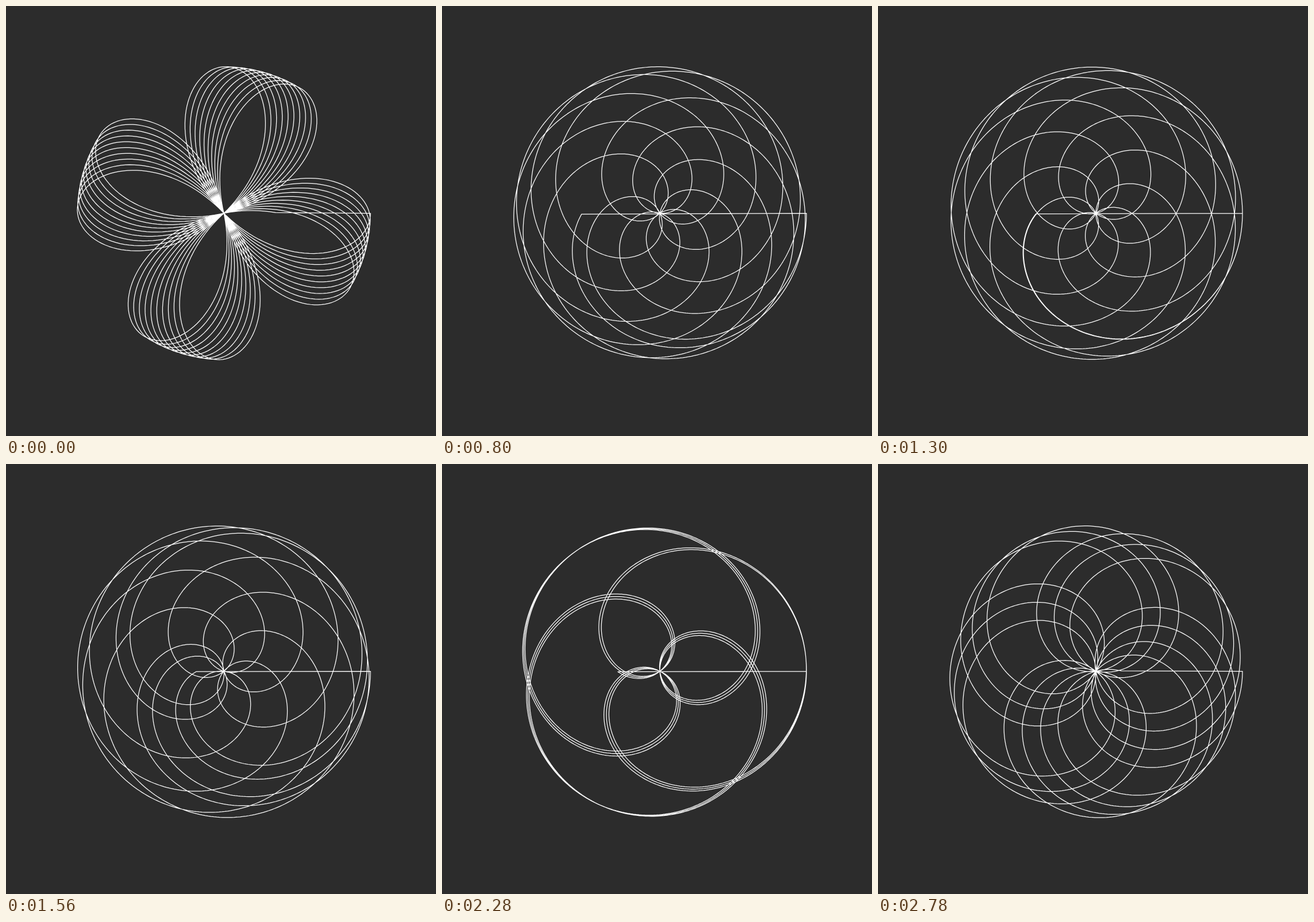
These frames come from a looping animation (748 by 748 pixels, 3.02 s). An HTML page with a canvas:

```html
<!DOCTYPE html>
<html lang="en">
<head>
<meta charset="utf-8">
<title>Rose curve</title>
<style>
  html, body { margin: 0; width: 100%; height: 100%; overflow: hidden; background: #2c2c2c; }
  canvas { display: block; width: 748px; height: 748px; }
</style>
</head>
<body>
<canvas id="stage" width="748" height="748"></canvas>
<script>
  const LOOP = 3020, HOLD = 250;
  const SIZE = 748, CX = 379, CY = 360.5, RADIUS = 255;
  const TURNS = 10, STEP = 0.02;

  // Key poses: time in ms and petal factor k of r = cos(k * angle)
  const KEYS = [
    { t: 0, k: 1.9811 },
    { t: 60, k: 0.205 },
    { t: 340, k: 0.2683 },
    { t: 800, k: 0.3661 },
    { t: 1300, k: 0.36835 },
    { t: 2020, k: 0.37975 },
    { t: 2520, k: 0.4948 },
    { t: 2760, k: 0.6779 }
  ];

  const ctx = document.getElementById("stage").getContext("2d");
  let shown = null;

  // Between two keys the petal width 1/k advances in equal held steps.
  function factorAt(ms) {
    const i = KEYS.findLastIndex(key => ms >= key.t);
    const from = KEYS[i];
    const to = KEYS[i + 1] || { t: LOOP, k: KEYS[0].k };
    const span = to.t - from.t;
    const steps = Math.max(1, Math.round(span / HOLD));
    const part = Math.floor((ms - from.t) / span * steps) / steps;
    return 1 / ((1 - part) / from.k + part / to.k);
  }

  function drawRose(k) {
    ctx.fillStyle = "#2c2c2c";
    ctx.fillRect(0, 0, SIZE, SIZE);
    ctx.strokeStyle = "#fff";
    ctx.lineWidth = 1.25;
    ctx.lineJoin = "round";
    ctx.beginPath();
    const count = Math.floor(TURNS * 2 * Math.PI / STEP);
    for (let i = 0; i <= count; i++) {
      const a = i * STEP;
      const r = RADIUS * Math.cos(k * a);
      ctx.lineTo(CX + r * Math.cos(a), CY + r * Math.sin(a));
    }
    ctx.closePath();
    ctx.stroke();
  }

  const begin = performance.now();

  function tick() {
    const k = factorAt((performance.now() - begin) % LOOP);
    if (k !== shown) {
      drawRose(k);
      shown = k;
    }
    requestAnimationFrame(tick);
  }

  tick();
</script>
</body>
</html>
```
